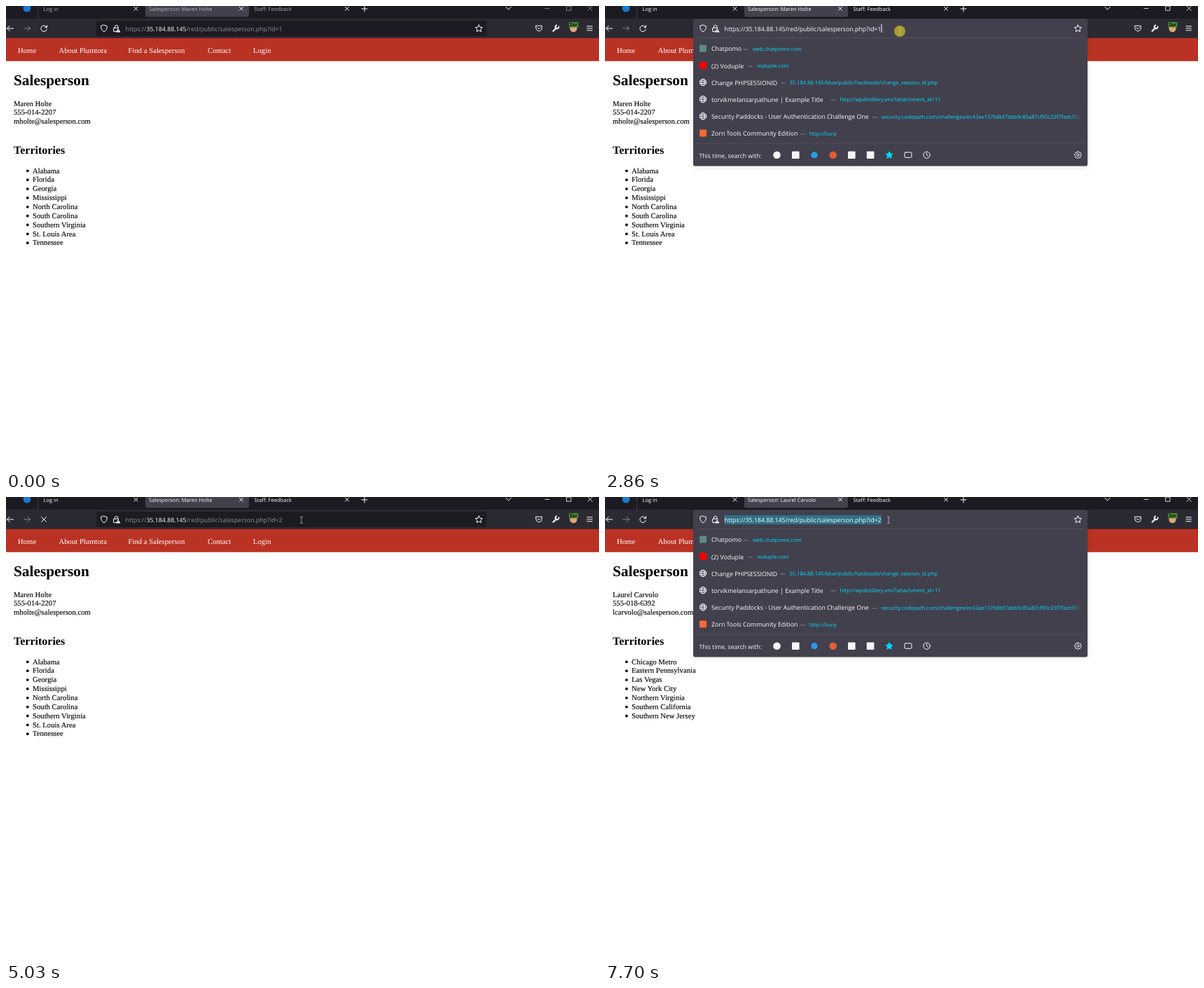
An HTML page that plays this animation: 847 px wide and 661 px high, repeating every 8000 ms.

```html
<!DOCTYPE html>
<html lang="en">
<head>
<meta charset="utf-8">
<title>Salesperson lookup</title>
<style>
  html, body { margin: 0; width: 100%; height: 100%; overflow: hidden; background: #fff; }
  svg { display: block; }
  text { text-rendering: geometricPrecision; white-space: pre; }
  .page { font: 10.7px "Liberation Serif", "Times New Roman", serif; }
  #body text { stroke: #000; stroke-width: .12; }
  .ui { font: 8.77px "Open Sans", "Noto Sans", sans-serif; fill: #fbfbfe; }
  .small { font-size: 7.55px; }
  .link { font-size: 7.55px; fill: #00ddff; }
  .ico { fill: none; stroke: #fbfbfe; stroke-width: 1; stroke-linecap: round; stroke-linejoin: round; }
</style>
</head>
<body>
<svg width="847" height="661" viewBox="0 0 847 661">
  <defs>
    <filter id="shadow" x="-5%" y="-10%" width="110%" height="125%">
      <feDropShadow dx="0" dy="1.3" stdDeviation="4" flood-opacity=".1"/>
    </filter>
    <linearGradient id="fade">
      <stop offset="0" stop-color="#42414d" stop-opacity="0"/>
      <stop offset="1" stop-color="#42414d"/>
    </linearGradient>
    <clipPath id="rowClip"><rect x="126" y="46" width="555" height="150"/></clipPath>
    <g id="globe" class="ico" stroke-width=".9">
      <circle r="4.7"/><ellipse rx="2" ry="4.7"/><path d="M-4.4-1.5H4.4M-4.4 1.5H4.4"/>
    </g>
    <path id="arrow" d="M0 0V10L2.4 7.9 4 11.6 5.6 10.9 4 7.3H7.2Z"/>
  </defs>

  <g class="page">
    <rect width="847" height="661" fill="#fff"/>
    <rect y="45" width="847" height="33.7" fill="#ba3224"/>
    <g id="nav" fill="#fff"></g>
    <text x="11" y="113.3" font-size="21.33" font-weight="bold">Salesperson</text>
    <text x="11" y="210.7" font-size="16" font-weight="bold">Territories</text>
    <g id="body"></g>
  </g>

  <g id="chrome">
    <rect width="847" height="18.5" fill="#1c1b22"/>
    <rect y="18" width="847" height="27" fill="#2b2a33"/>
    <rect y="45" width="847" height=".6" fill="#1a1920"/>
    <path d="M45.5 0V18" stroke="#3d3c47"/>
    <circle cx="30" cy="3" r="5.5" fill="#1b78d0"/>
    <path d="M199 0H347V12.5Q347 15.5 344 15.5H202Q199 15.5 199 12.5Z" fill="#42414d"/>
    <path id="hover" d="M349 0H497.5V12.5Q497.5 15.5 494.5 15.5H352Q349 15.5 349 12.5Z" fill="#35343d"/>
    <g id="titles" class="ui small">
      <text x="53.5" y="7">Log in</text>
      <text id="title" x="204" y="7"></text>
      <text x="354.5" y="7">Staff: Feedback</text>
    </g>
    <g id="closers" class="ico"></g>
    <path class="ico" d="M508 4H516M512 0V8" />
    <path class="ico" d="M714 1.5L717.7 5 721.4 1.5"/>
    <path id="winButtons" class="ico" style="stroke-width:.8" d="M770 3.5H776M801 .2H807V6.3H801ZM831 0L837.5 6.5M837.5 0L831 6.5"/>
    <path class="ico" d="M10.5 32H1.5M5.2 28.3L1.5 32 5.2 35.7"/>
    <path class="ico" opacity=".42" d="M25.5 32H34.5M30.8 28.3L34.5 32 30.8 35.7"/>
    <g id="reload" class="ico"><path d="M58 30.2A4.3 4.3 0 1 0 58.4 33.2M58.5 27.8V30.6H55.6"/></g>
    <path id="stop" class="ico" d="M50.5 28.5L57.5 35.5M57.5 28.5L50.5 35.5"/>
    <path class="ico" d="M757 28.2H765.4V31.6A4.2 4.2 0 0 1 757 31.6ZM759 30.8L761.2 33 763.4 30.8"/>
    <path d="M781.6 35.8L786.2 31.2" stroke="#fbfbfe" stroke-width="2.2" stroke-linecap="round"/>
    <path d="M789.3 28.6A2.6 2.6 0 1 1 787 27.3" fill="none" stroke="#fbfbfe" stroke-width="1.7"/>
    <circle cx="810.5" cy="32" r="5.2" fill="#d9a876"/>
    <rect x="804" y="23" width="13.5" height="7.5" rx="1" fill="#4c8a35"/>
    <text x="805" y="29.2" class="ui" style="font-size:6.7px;font-weight:700;fill:#0b0b0b">Zor</text>
    <path class="ico" d="M830 28.8H837.4M830 31.8H837.4M830 34.8H837.4"/>
    <rect id="field" x="129" y="21" width="557.5" height="22" rx="3" fill="#1c1b22"/>
  </g>

  <g id="panel" class="ui">
    <rect id="sheet" x="126" y="18.5" width="563.3" height="210" rx="2.7" fill="#42414d" filter="url(#shadow)"/>
    <path d="M131 45.5H685" stroke="#5a5965" stroke-width=".7"/>
    <g id="history" clip-path="url(#rowClip)"></g>
    <g id="match">
      <rect x="131" y="50" width="554" height="21" rx="3" fill="#2b2a33"/>
      <use href="#globe" x="140" y="60.5"/>
      <text id="visit" x="152" y="64.2"></text>
      <text id="visitHint" y="63.6" class="small"><tspan fill="#b5b5bd">—</tspan><tspan dx="4.5">Visit</tspan></text>
      <g id="suggest">
        <text x="134.5" y="85" style="font-size:6.9px">Firefox Suggest</text>
        <use href="#globe" x="140" y="98.5"/>
        <text x="152" y="102">Salesperson: Dummy Placeholm (NOT PUBLIC UNTIL SEPT. 1)</text>
        <text x="399.7" y="101.5" class="small" fill="#b5b5bd">—</text>
        <text x="413" y="101.5" class="link">35.184.88.145/red/public/salesperson.php?id=10</text>
      </g>
    </g>
    <g id="engines">
      <path d="M131 -16.5H685" stroke="#54535f" stroke-width=".7"/>
      <text x="134.5" y="4" style="font-size:8.65px">This time, search with:</text>
      <circle cx="245.5" cy="0" r="5.3" fill="#f6f6f8"/>
      <rect x="267" y="-5.3" width="10.6" height="10.6" rx="1" fill="#f6f6f8"/>
      <circle cx="299" cy="0" r="4.6" fill="#2a9bea"/>
      <circle cx="325.7" cy="0" r="5.3" fill="#de5f35"/>
      <rect x="347" y="-5.3" width="10.6" height="10.6" rx="1" fill="#f6f6f8"/>
      <rect x="373.8" y="-5.3" width="10.6" height="10.6" rx="1" fill="#f6f6f8"/>
      <path id="bigStar" fill="#00ddff" stroke="#00ddff" stroke-linejoin="round"/>
      <rect class="ico" x="428" y="-3.8" width="10" height="7.4" rx="1.3"/>
      <g class="ico"><circle cx="459.6" cy="0" r="4.7"/><path d="M459.6 -2.7V0L461.5 1.5"/></g>
      <path id="gear" class="ico" style="stroke-width:.9" transform="translate(675.5)"/>
      <circle class="ico" cx="675.5" cy="0" r="1.6" style="stroke-width:.9"/>
    </g>
  </g>

  <g id="siteIcons">
    <path class="ico" d="M140 27.2L144.3 28.7Q144.6 34.4 140 36.9 135.4 34.4 135.7 28.7Z"/>
    <path class="ico" d="M155.5 31V29.2A2.3 2.3 0 0 1 160 29.2V31M157.3 36.4H153.7V31.2H160.6"/>
    <path d="M160.2 31.7L163.6 37.4H156.8Z" fill="#fbfbfe"/>
    <path d="M160.2 33.6V35.3M160.2 36V36.7" stroke="#2b2a33" stroke-width=".8"/>
    <path id="star" class="ico"/>
  </g>
  <g id="searchIcons" class="ico">
    <circle cx="139" cy="31" r="3.2"/><path d="M141.4 33.4L144.3 36.4M671 32H680M676.4 28.4L680 32 676.4 35.6"/>
  </g>
  <rect id="selection" x="170.5" y="26" width="224.5" height="13" fill="#2f7188"/>
  <text id="url" class="ui" y="36"><tspan></tspan><tspan></tspan><tspan></tspan></text>
  <rect id="caret" y="26" width="1" height="12" fill="#fbfbfe"/>

  <g id="trail">
    <use href="#arrow" x="288" y="54" fill="#2c1e20" opacity=".85"/>
    <use href="#arrow" x="377" y="18" fill="#15141a" opacity=".45"/>
  </g>
  <circle id="press" r="8" fill="#a99a2c"/>
  <use id="pointer" href="#arrow" fill="#111" stroke="#fff" stroke-width=".6"/>
  <path id="beam" d="M-2-4.4H-.6L0-4 .6-4.4H2M0-4V4M-2 4.4H-.6L0 4 .6 4.4H2" fill="none" stroke="#c4c4ca" stroke-width=".75"/>
</svg>

<script>
const $ = id => document.getElementById(id);
const show = (id, on) => { $(id).style.display = on ? "" : "none"; };
const between = (t, a, b) => t >= a && t < b;
const put = (id, x, y) => $(id).setAttribute("transform", `translate(${x} ${y})`);
const label = (x, y, s, cls = "") => `<text x="${x}" y="${y}" class="${cls}">${s}</text>`;

const LOOP = 8000;
const FOCUS = 2790, RELEASE = 2930, CLICK = 3420, ERASE = 4360, SHRINK = 4420,
      TYPE = 4490, ENTER = 4950, LOADED = 5400, REOPEN = 7550, RESELECT = 7690;
const URL_PARTS = ["https://", "35.184.88.145", "/red/public/salesperson.php?id="];

const PEOPLE = [
  { name: "Maren Holte", phone: "555-014-2207", mail: "mholte",
    areas: ["Alabama", "Florida", "Georgia", "Mississippi", "North Carolina", "South Carolina",
            "Southern Virginia", "St. Louis Area", "Tennessee"] },
  { name: "Laurel Carvolo", phone: "555-018-6392", mail: "lcarvolo",
    areas: ["Chicago Metro", "Eastern Pennsylvania", "Las Vegas", "New York City",
            "Northern Virginia", "Southern California", "Southern New Jersey"] }
];

// title, link x, link, icon colour (none = globe)
const HISTORY = [
  ["Chatpomo", 211, "web.chatpomo.com", "#5d8c82"],
  ["(2) Voduple", 217, "voduple.com", "#f00"],
  ["Change PHPSESSIONID", 263.5, "35.184.88.145/blue/public/hacktools/change_session_id.php"],
  ["torvikmelansarpathune | Example Title", 335.5, "http://wpdistillery.vm/?attachment_id=11"],
  ["Security Paddocks - User Authentication Challenge One", 394.7,
   "security.codepath.com/challenges/ec43ae137b8bf7abb9c85a87cf95c23f7fadcf08"],
  ["Zorn Tools Community Edition", 291.7, "http://burp", "#ff6633"]
];

// time, x, y
const PATH = [
  [260, 761, 629], [330, 762, 638], [580, 762, 638], [650, 763, 638], [850, 763, 638],
  [1080, 540, 510], [1250, 318, 398], [1320, 326, 431], [1520, 326, 431], [1660, 314, 330],
  [1790, 270, 165], [1860, 260, 100], [1920, 288, 54], [1990, 378, 17], [2050, 435, 29],
  [2260, 435, 29], [2450, 424, 36], [2700, 421.5, 36], [3270, 421.5, 36], [3280, 422, 33],
  [6210, 422, 33], [6290, 412, 8], [6420, 340, 90], [6580, 165, 200], [6700, 88, 245],
  [6850, 112, 271], [7010, 215, 170], [7090, 215, 170], [7250, 365, 55], [7400, 405, 33]
];

// closed outline of n points around a centre, radius given per index
function ring(cx, cy, n, radius) {
  const pts = Array.from({ length: n }, (_, i) => {
    const a = (2 * i / n - .5) * Math.PI, r = radius(i);
    return `${(cx + r * Math.cos(a)).toFixed(2)} ${(cy + r * Math.sin(a)).toFixed(2)}`;
  });
  return `M${pts.join("L")}Z`;
}
const starPath = (cx, cy, r) => ring(cx, cy, 10, i => i % 2 ? r * .5 : r);

function personPage(p) {
  const lines = [p.name, p.phone, p.mail + "@salesperson.com"];
  return lines.map((s, i) => label(11, 143 + i * 12.35, s)).join("") +
    p.areas.map((s, i) => {
      const y = 238.5 + i * 12.87;
      return `<circle cx="30.8" cy="${y - 3.2}" r="1.9"/>` + label(38, y, s);
    }).join("");
}

function historyRow([title, x, link, color], i) {
  const y = 60.5 + i * 24.2;
  const icon = color ? `<rect x="135" y="${y - 5}" width="10" height="10" rx="1" fill="${color}"/>`
                     : `<use href="#globe" x="140" y="${y}"/>`;
  return icon + label(152, y + 3.8, title) +
    `<text x="${x - 13.3}" y="${y + 3.2}" class="small" fill="#b5b5bd">—</text>` +
    label(x, y + 3.2, link, "link");
}

$("nav").innerHTML = [[17, "Home"], [75.5, "About Plumtora"], [174.5, "Find a Salesperson"],
  [288, "Contact"], [353, "Login"]].map(([x, s]) => label(x, 67.2, s)).join("");
$("history").innerHTML = HISTORY.map(historyRow).join("") +
  `<rect x="664" y="147" width="18" height="20" fill="url(#fade)"/>`;
$("closers").innerHTML = [185.5, 336, 487].map(x =>
  `<path d="M${x - 2.5} 1.2l5 5m0-5l-5 5"/>`).join("");
$("star").setAttribute("d", starPath(675.5, 32.3, 5.3));
$("bigStar").setAttribute("d", starPath(406, .3, 5.2));
$("gear").setAttribute("d", ring(0, 0, 32, i => i % 4 < 2 ? 5 : 3.8));

let shown = -1;
function setPerson(i) {
  if (i === shown) return;
  shown = i;
  $("body").innerHTML = personPage(PEOPLE[i]);
  $("title").textContent = "Salesperson: " + PEOPLE[i].name;
}

function pointerAt(t) {
  const i = PATH.findIndex(k => k[0] > t);
  if (i < 0) return PATH[PATH.length - 1].slice(1);
  if (i === 0) return PATH[0].slice(1);
  const [a, x0, y0] = PATH[i - 1], [b, x1, y1] = PATH[i], k = (t - a) / (b - a);
  return [x0 + (x1 - x0) * k, y0 + (y1 - y0) * k];
}

function drawUrl(t, focused, typing) {
  const id = t < ERASE ? "1" : t < TYPE ? "" : "2";
  const parts = [URL_PARTS[0], URL_PARTS[1], URL_PARTS[2] + id];
  const url = $("url"), x = typing ? 152 : 170.5;
  url.setAttribute("x", x);
  [...url.children].forEach((span, i) => {
    span.textContent = parts[i];
    span.style.fill = focused || i === 1 ? "#fbfbfe" : "#8f8f99";
  });
  $("caret").setAttribute("x", x + url.getComputedTextLength());
}

function drawPanel(t, open) {
  const small = between(t, SHRINK, ENTER), hinted = t < 4700;
  show("panel", open);
  show("history", !small);
  show("match", small);
  show("suggest", hinted);
  const mid = !small ? 212.7 : hinted ? 129.5 : 92;
  put("engines", 0, mid);
  $("sheet").setAttribute("height", mid - 2.7);
  const updated = t >= 4560;
  $("visit").textContent = URL_PARTS.join("") + (updated ? "2" : "");
  $("visitHint").setAttribute("x", updated ? 379.5 : 374.5);
}

function drawPointer(t) {
  const [x, y] = pointerAt(t), text = y > 20 && y < 45 && x > 165 && x < 660;
  show("pointer", t >= 260 && !text);
  show("beam", text);
  put("pointer", x, y);
  put("beam", x, y);
  put("press", x - .5, y);
  show("press", between(t, FOCUS, RELEASE) || between(t, CLICK, 3480) || between(t, REOPEN, RESELECT));
  show("trail", between(t, 2000, 2120));
  show("hover", between(t, 1960, 2120) || between(t, 6250, 6350));
}

function draw(t) {
  const focused = between(t, FOCUS, ENTER) || t >= REOPEN;
  const typing = between(t, ERASE, ENTER);
  const selected = between(t, RELEASE, CLICK) || t >= RESELECT;
  const active = t >= FOCUS;
  setPerson(t < LOADED ? 0 : 1);
  $("titles").style.opacity = active ? 1 : .62;
  $("winButtons").style.opacity = active ? 1 : .55;
  show("reload", !between(t, ENTER, LOADED));
  show("stop", between(t, ENTER, LOADED));
  $("reload").style.opacity = between(t, LOADED, 6030) ? .42 : 1;
  drawPanel(t, focused);
  show("siteIcons", !typing);
  show("searchIcons", typing);
  show("selection", selected);
  drawUrl(t, focused, typing);
  show("caret", focused && !selected && !between(t, 3880, ERASE));
  drawPointer(t);
}

function tick() {
  draw(performance.now() % LOOP);
  requestAnimationFrame(tick);
}
tick();
</script>
</body>
</html>
```
